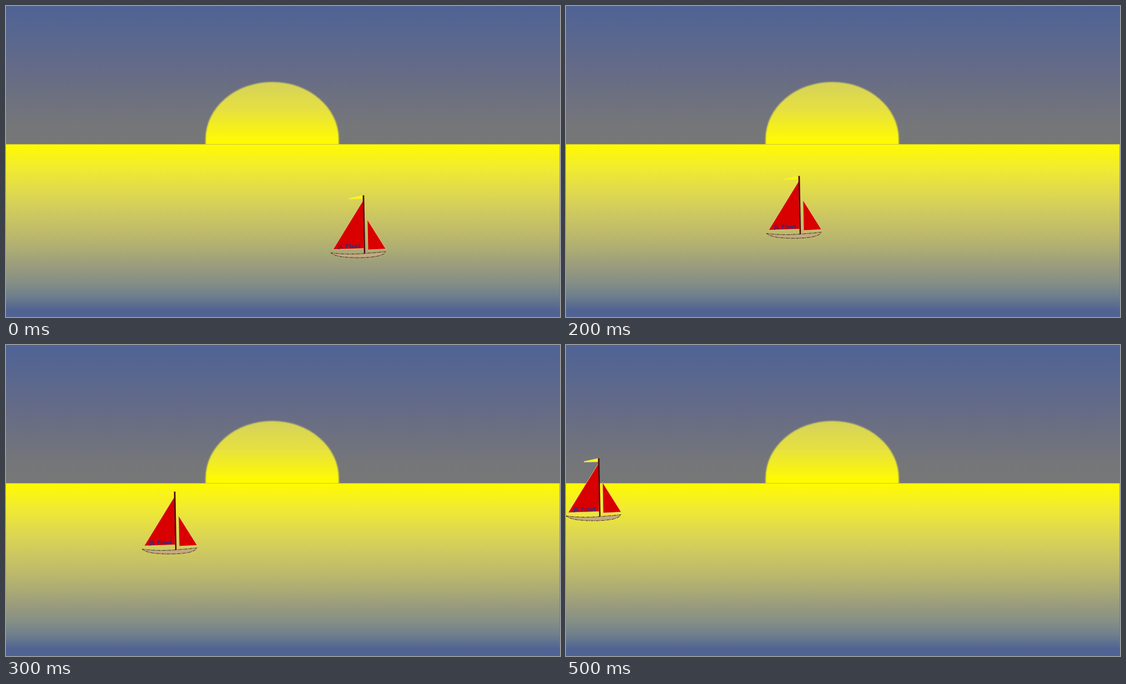
These frames come from a looping animation (998x561 px, 0.6 s). An HTML page:

```html
<!DOCTYPE html>
<html lang="en">
<head>
<meta charset="utf-8">
<title>Sailing boat at sunset</title>
<style>
html, body { margin: 0; width: 100%; height: 100%; overflow: hidden; background: #506394; }
svg { display: block; width: 100vw; height: 100vh; }
text { font: bold 9.5px "DejaVu Sans", Verdana, sans-serif; fill: #2c2c86; }
</style>
</head>
<body>
<svg viewBox="0 0 998 561" preserveAspectRatio="none">
  <defs>
    <linearGradient id="sky" gradientUnits="userSpaceOnUse" x1="0" y1="0" x2="0" y2="249">
      <stop offset="0" stop-color="#506395"/>
      <stop offset=".12" stop-color="#546592"/>
      <stop offset=".5" stop-color="#676c86"/>
      <stop offset=".85" stop-color="#747679"/>
      <stop offset="1" stop-color="#777777"/>
    </linearGradient>
    <linearGradient id="glow" gradientUnits="userSpaceOnUse" x1="0" y1="137" x2="0" y2="249">
      <stop offset="0" stop-color="#d5d25b"/>
      <stop offset=".45" stop-color="#e6e041"/>
      <stop offset=".9" stop-color="#fdf808"/>
      <stop offset="1" stop-color="#fffb00"/>
    </linearGradient>
    <linearGradient id="sea" gradientUnits="userSpaceOnUse" x1="0" y1="250" x2="0" y2="561">
      <stop offset="0" stop-color="#fffa00"/>
      <stop offset=".13" stop-color="#f2ec2f"/>
      <stop offset=".29" stop-color="#ddd751"/>
      <stop offset=".42" stop-color="#cbc662"/>
      <stop offset=".52" stop-color="#bdb96b"/>
      <stop offset=".61" stop-color="#acac74"/>
      <stop offset=".71" stop-color="#999b7d"/>
      <stop offset=".8" stop-color="#858f86"/>
      <stop offset=".88" stop-color="#6e7e8c"/>
      <stop offset=".96" stop-color="#506392"/>
      <stop offset="1" stop-color="#506395"/>
    </linearGradient>
    <filter id="soft" x="-5%" y="-5%" width="110%" height="110%">
      <feGaussianBlur stdDeviation="1"/>
    </filter>
    <clipPath id="above"><rect width="998" height="249.5"/></clipPath>
  </defs>

  <rect width="998" height="250" fill="url(#sky)"/>
  <g clip-path="url(#above)">
    <path d="M359.5 256V240A120 103 0 0 1 599.5 240V256Z" fill="url(#glow)" filter="url(#soft)"/>
  </g>
  <rect y="249.5" width="998" height="311.5" fill="url(#sea)"/>
  <path d="M359 249.5H600" stroke="#c8c24c"/>
  <path d="M997.5 250V545" stroke="#77794f" stroke-opacity=".6"/>

  <g id="boat">
    <path d="M617 347.2L643 341.5V347.8L618 348.2Z" fill="#fdf900" stroke="#e6dfa0" stroke-width=".6"/>
    <g fill="#d80000" stroke="#e2d48c" stroke-width=".8">
      <path d="M643.5 350.5L589 439.3L645 437.5Z"/>
      <path d="M650.8 385L684.3 438.3L652 440Z"/>
    </g>
    <path d="M585 445.2Q612 449 645 446.5T684 443Q683 448 668 451.5Q640 456 606 452.5Q590 450 585 445.2Z"
      fill="#c4a882" stroke="#2e2418" stroke-width="1" stroke-dasharray="5 1.5 2 1"/>
    <path d="M642.5 341.5H645.3L647.2 446.5H644.8Z" fill="#50060c"/>
    <text x="599" y="437" transform="rotate(-1 599 437)">JL Fleet</text>
  </g>
</svg>
<script>
const boat = document.getElementById("boat");
const STEP = 100;

// Boat offsets, one per hard step
const course = [[0, 0], [-118, -13], [-224, -35], [-340, -77], [-457, -92], [-585, -137]];

function draw(time) {
  const [x, y] = course[Math.floor(time / STEP) % course.length];
  boat.setAttribute("transform", `translate(${x} ${y})`);
}

function tick() {
  draw(performance.now());
  requestAnimationFrame(tick);
}

draw(0);
requestAnimationFrame(tick);
</script>
</body>
</html>
```
